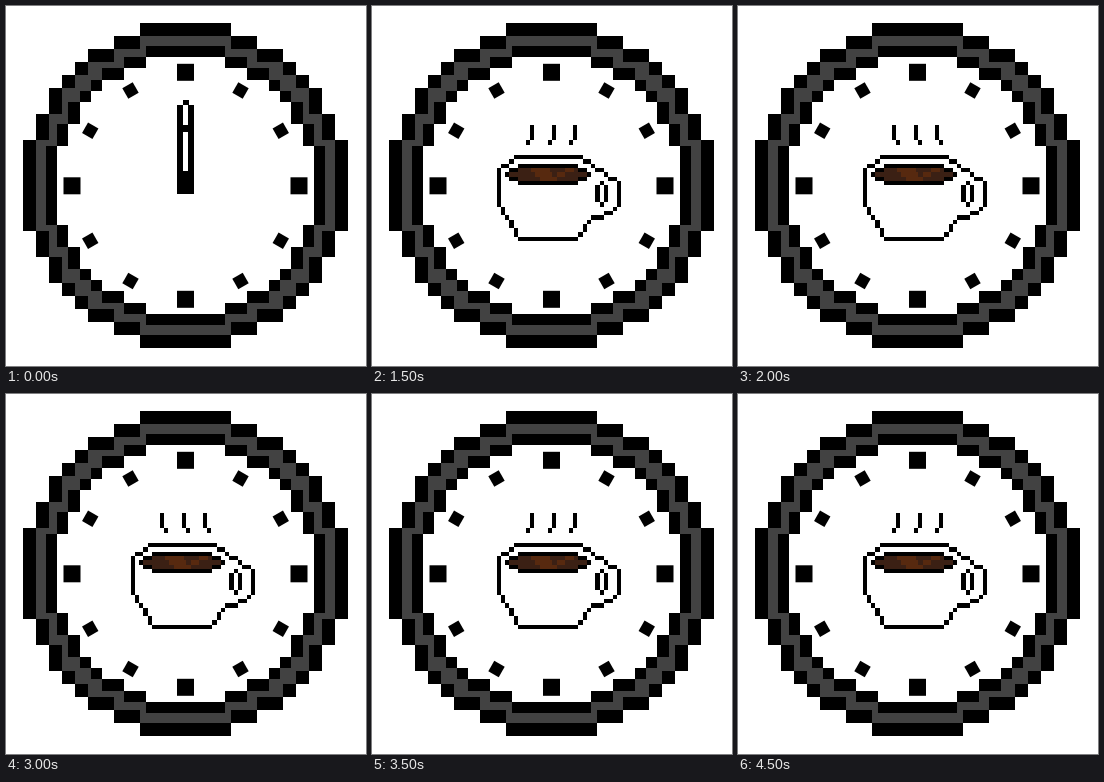
These frames come from a looping animation (360 px wide and 360 px high, 5000 ms). An HTML page with a canvas:

```html
<!DOCTYPE html>
<html lang="en">
<head>
<meta charset="utf-8">
<title>Coffee o'clock</title>
<style>
html, body { margin: 0; height: 100%; overflow: hidden; background: #fff; }
canvas { display: block; }
</style>
</head>
<body>
<canvas id="stage" width="360" height="360"></canvas>
<script>
const ctx = document.getElementById('stage').getContext('2d');
const MID = 179.5, BLACK = '#000', WHITE = '#fff', GREY = '#424242';
const COFFEE = '#3b2014', CREMA = '#57290f';

// Cup pixels: size and top left corner of the grid.
const PX = 4.3, LEFT = 124.5, TOP = 149;

// Fill between two corners, snapped to whole pixels.
function box(color, x1, y1, x2, y2) {
  x1 = Math.round(x1); y1 = Math.round(y1);
  ctx.fillStyle = color;
  ctx.fillRect(x1, y1, Math.round(x2) - x1, Math.round(y2) - y1);
}

// A blocky disc 25 cells wide with a rim of one cell.
function disc(cell, rim, fill) {
  const at = n => MID + (n - 12.5) * cell;
  const edge = row => Math.round(12.5 - Math.sqrt(12.5 ** 2 - (row - 12) ** 2));
  for (let row = 0; row < 25; row++) {
    const k = Math.min(row, 24 - row), out = edge(k);
    box(rim, at(out), at(row), at(25 - out), at(row + 1));
    if (!k) continue;
    const inner = Math.max(out + 1, edge(k - 1));
    box(fill, at(inner), at(row), at(25 - inner), at(row + 1));
  }
}

function ticks() {
  for (let i = 0; i < 12; i++) {
    const main = i % 3 === 0;
    const r = main ? 113.5 : 110, size = main ? 17 : 12;
    ctx.save();
    ctx.translate(MID, MID + 0.3);
    ctx.rotate(i * Math.PI / 6);
    ctx.fillStyle = BLACK;
    ctx.fillRect(-size / 2, -r - size / 2, size, size);
    ctx.restore();
  }
}

function hands() {
  box(BLACK, 177, 94, 183, 100);
  box(BLACK, 171, 99, 188, 188);
  box(WHITE, 177, 99, 182, 119);
  box(WHITE, 177, 126, 182, 165);
}

function cells(color, col, row, width = 1) {
  const x = LEFT + col * PX, y = TOP + row * PX;
  box(color, x, y, x + width * PX, y + PX);
}

// Closed outline of pixel lines through the given cells.
function outline(points) {
  points.forEach(([x1, y1], i) => {
    const [x2, y2] = points[(i + 1) % points.length];
    const n = Math.max(Math.abs(x2 - x1), Math.abs(y2 - y1));
    for (let s = 0; s < n; s++) {
      cells(BLACK, Math.round(x1 + (x2 - x1) * s / n), Math.round(y1 + (y2 - y1) * s / n));
    }
  });
}

function cup() {
  outline([[4, 0], [19, 0], [22, 2], [28, 6], [28, 11], [26, 13], [22, 14],
    [18, 19], [5, 19], [0, 11], [0, 3]]);
  outline([[24, 6], [25, 7], [25, 10], [24, 11], [23, 10], [23, 7]]);
  for (let row = 3; row < 6; row++) {
    const inset = row === 4 ? 3 : 5;
    cells(COFFEE, inset, row, 24 - 2 * inset);
    cells(CREMA, 5 + row, row, 6 - row / 2);
    cells(CREMA, 22 - 2 * row, row, 2);
  }
  outline([[5, 2], [18, 2], [21, 4], [18, 6], [5, 6], [2, 4]]);
}

function steam(flip) {
  for (let i = 0; i < 3; i++) {
    const x = 154 + 21.5 * i, stem = flip ? x + 4 : x, drop = flip ? x : x + 4;
    box(BLACK, stem, 119, stem + 4, 134);
    box(BLACK, drop, 134, drop + 4, 139);
  }
}

function draw(t) {
  box(WHITE, 0, 0, 360, 360);
  disc(13, BLACK, GREY);
  disc(11.15, BLACK, WHITE);
  ticks();
  if (t < 1000) return hands();
  cup();
  steam(Math.floor(t / 500) % 2 === 1);
}

const start = performance.now();
function frame() {
  draw((performance.now() - start) % 5000);
  requestAnimationFrame(frame);
}
frame();
</script>
</body>
</html>
```
